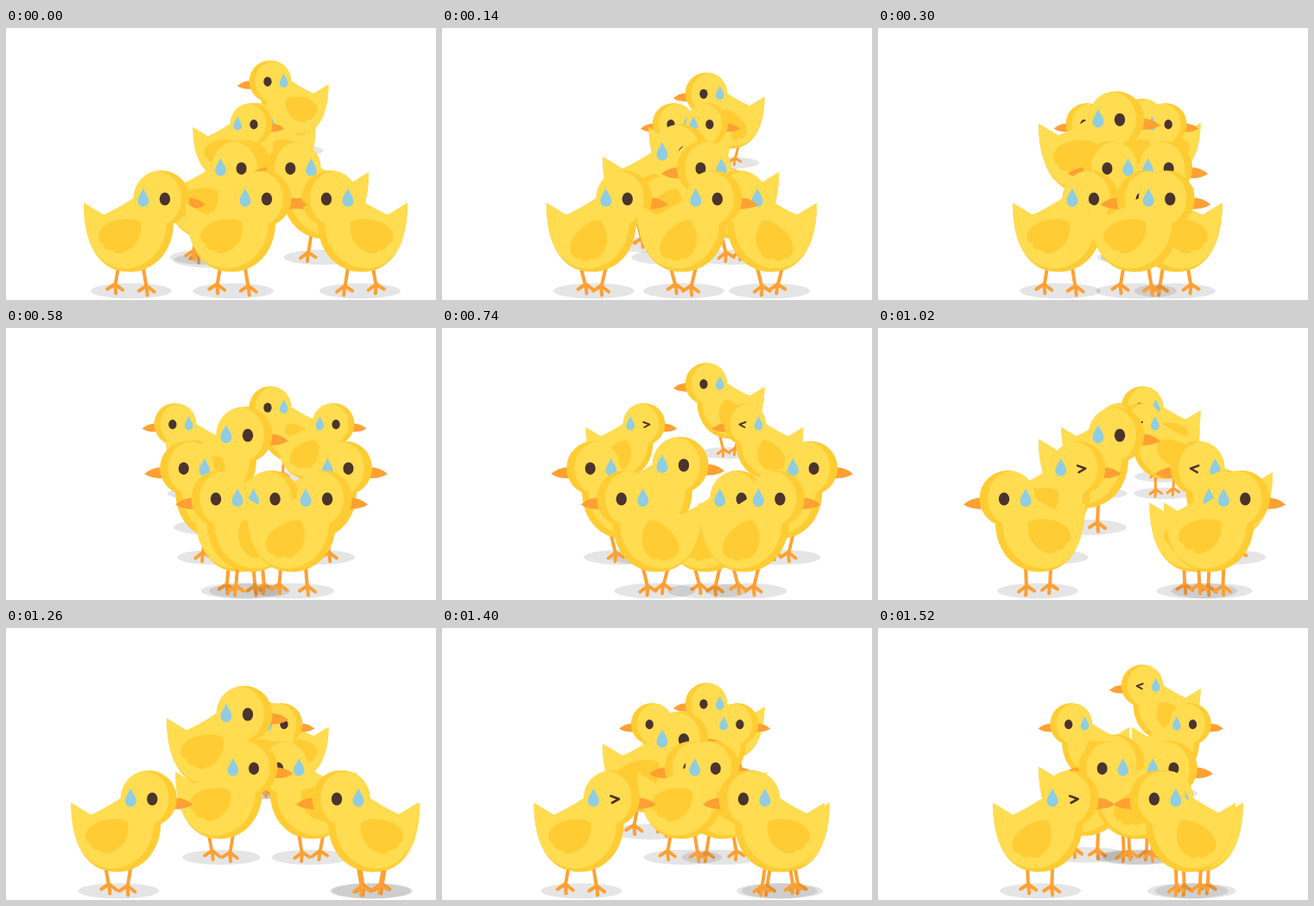
These frames come from a looping animation (498x315 px, 1540 ms). An HTML page with a canvas:

```html
<!DOCTYPE html>
<html lang="en">
<head>
<meta charset="utf-8">
<title>Running chicks</title>
<style>
html, body { margin: 0; overflow: hidden; background: #fff; }
canvas { display: block; }
</style>
</head>
<body>
<canvas id="stage" width="498" height="315"></canvas>
<script>
const ctx = document.getElementById('stage').getContext('2d');
const LOOP = 1540, STEP = 20;
const YELLOW = '#ffdc50', GOLD = '#ffcc33', ORANGE = '#ffa033', BROWN = '#4b342e', BLUE = '#90cde2';

// Shapes of a chick facing right; the origin is the middle of its shadow.
const body = new Path2D('M-55 -102 L-32 -88 Q-16 -95 2 -107 L49 -82 C50 -45 26 -22 -2 -22 C-40 -22 -55 -58 -55 -102Z');
const belly = new Path2D('M-55 -102 L-32 -88 Q-16 -95 2 -107 L41 -82 C42 -50 20 -27 -6 -26 C-41 -26 -55 -59 -55 -102Z');
const wing = new Path2D('M11 -79 C5 -84 -5 -84 -16 -82 C-30 -79 -39 -71 -38 -62 C-38 -57 -34 -55 -32 -55 C-33 -49 -26 -46 -22 -48 C-20 -43 -14 -43 -11 -44 C4 -48 13 -62 11 -79Z');
const beak = new Path2D('M65 -108 Q77 -108 86 -100 Q77 -94 63 -95Z');
const drop = new Path2D('M14 -119 C16 -114 20.5 -109 20.5 -104 A6.5 6.5 0 0 1 7.5 -104 C7.5 -109 12 -114 14 -119Z');
const wink = new Path2D('M34 -110 L43.5 -106.5 L35.5 -102');

function fill(path, color) {
  ctx.fillStyle = color;
  ctx.fill(path);
}

function ellipse(x, y, rx, ry, color) {
  ctx.fillStyle = color;
  ctx.beginPath();
  ctx.ellipse(x, y, rx, ry, 0, 0, 2 * Math.PI);
  ctx.fill();
}

function leg(hip, foot, y) {
  ctx.beginPath();
  ctx.moveTo(hip, -27);
  ctx.lineTo(foot, y);
  for (const [dx, dy] of [[-9, 3], [1, 8], [9, 4]]) {
    ctx.moveTo(foot, y - 3);
    ctx.lineTo(foot + dx, y + dy);
  }
  ctx.stroke();
}

function flappingWing(angle) {
  ctx.save();
  ctx.translate(4, -74);
  ctx.rotate(-angle);
  ctx.translate(-4, 74);
  fill(wing, GOLD);
  ctx.restore();
}

function chick({ x, y, dir, size, winking }, swing, flap) {
  ctx.save();
  ctx.translate(x, y);
  ctx.scale(dir * size, size);
  ctx.translate(-15, 0);
  ctx.lineCap = ctx.lineJoin = 'round';

  ellipse(0, 0, 47, 9, 'rgba(0,0,0,.1)');
  ctx.strokeStyle = ORANGE;
  ctx.lineWidth = 4;
  leg(-15, -15 - swing, -5);
  leg(14, 14 + swing, -3);

  fill(beak, ORANGE);
  fill(body, GOLD);
  ellipse(35, -107, 32.5, 32.5, GOLD);
  fill(belly, YELLOW);
  ellipse(30.5, -107, 27.5, 31.5, YELLOW);
  flappingWing(flap);
  fill(drop, BLUE);
  if (winking) {
    ctx.strokeStyle = BROWN;
    ctx.lineWidth = 2.6;
    ctx.stroke(wink);
  } else {
    ellipse(39, -106.5, 6.2, 7.5, BROWN);
  }
  ctx.restore();
}

// Runs at constant speed, then turns round; winks shortly after the turn.
function runner(start, speed, turn, back, y, size, winks = true) {
  return t => {
    const after = t - turn;
    return {
      x: start + speed * Math.min(t, turn) - back * Math.max(after, 0),
      y, size,
      dir: Math.sign(after < 0 ? speed : -back),
      winking: winks && after > 70 && after < 400
    };
  };
}

// Slides up and down on the spot every 800 ms.
function bobber(x, dir, from, to, size, winkAt) {
  return t => ({
    x, dir, size,
    y: from + (to - from) * (1 - Math.cos(Math.PI * t / 400)) / 2,
    winking: t >= winkAt
  });
}

// Back to front.
const flock = [
  bobber(321, -1, 142, 194, .75, 1440),
  runner(306, -.164, 635, -.1635, 191.5, .75),
  runner(269, .164, 665, .163, 191.5, .75),
  bobber(256, 1, 269, 203, 1, Infinity),
  runner(249.5, .2135, 838, .2135, 265.5, .965),
  runner(352.5, -.213, 838, -.213, 265.5, .965),
  runner(160, .22, 1196, .217, 304.5, 1, false),
  runner(395, -.2206, 1196, -.222, 304.5, 1),
  runner(278, .1209, 1196, .243, 304.5, 1, false)
];

function frame(now) {
  const t = Math.floor(now % LOOP / STEP) * STEP;
  const swing = 5 * Math.cos(2 * Math.PI * (t / 100 + .05)) - 1;
  const flap = .6 * Math.max(0, -Math.sin(2 * Math.PI * t / 200));
  ctx.fillStyle = '#fff';
  ctx.fillRect(0, 0, 498, 315);
  for (const at of flock) chick(at(t), swing, flap);
  requestAnimationFrame(frame);
}
requestAnimationFrame(frame);
</script>
</body>
</html>
```
